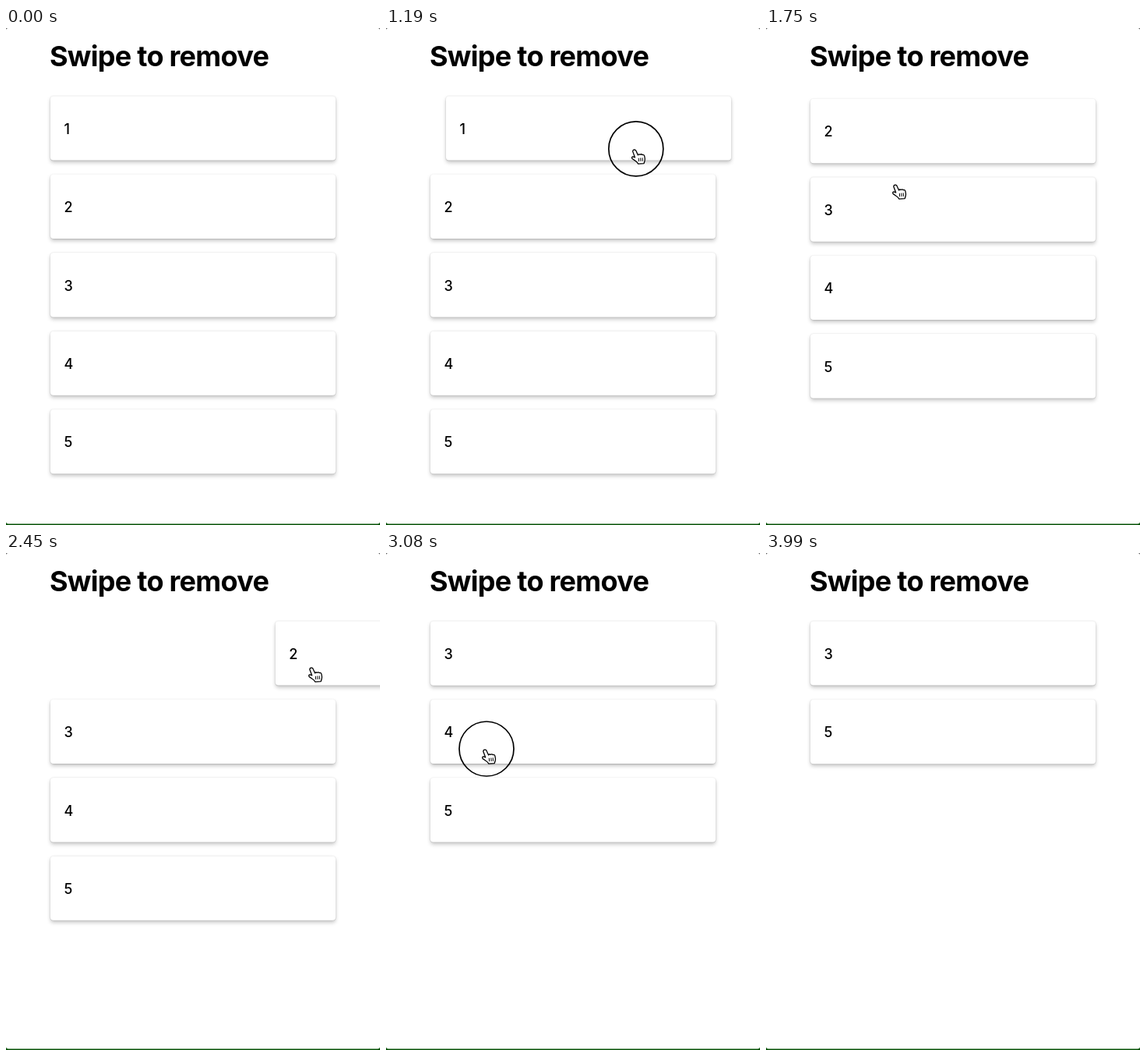
An HTML page with a canvas for the animation above (4.2 s loop, 480x637 px).

```html
<!DOCTYPE html>
<html lang="en">
<head>
<meta charset="utf-8">
<title>Swipe to remove</title>
<style>
  html, body { margin: 0; width: 100%; height: 100%; overflow: hidden; background: #fff; }
  canvas { display: block; }
</style>
</head>
<body>
<canvas id="stage" width="480" height="637"></canvas>
<script>
const ctx = document.getElementById('stage').getContext('2d');
const LOOP = 4200, STEP = 70;
const CARD = { x: 57, y: 87.2, w: 366, h: 82.4, pitch: 100.4 };

// Every swipe follows the same rule from the moment its drag starts.
const swipes = [{ card: 0, start: 1120 }, { card: 1, start: 2184 }, { card: 3, start: 3126 }];
const SWIPE_MS = 306;
const dragOffset = ms => 20 * (Math.max(0, ms) / 70) ** 2;
const isPressed = ms => ms >= -50 && ms < 190;

// Turning points of the pointer, eased in between.
const pointer = [
  { t: 140, x: 321, y: 202 },
  { t: 210, x: 279, y: 134 },
  { t: 1050, x: 279, y: 134 },
  { t: 1120, x: 301, y: 154 },
  { t: 1400, x: 428, y: 160 },
  { t: 1750, x: 168, y: 200 },
  { t: 2184, x: 105, y: 146 },
  { t: 2450, x: 394, y: 146 },
  { t: 3080, x: 129, y: 251 },
  { t: 3330, x: 320, y: 262 },
  { t: 3570, x: 195, y: 444.5 },
  { t: 3850, x: 260, y: 602 },
];
const POINTER_END = 3990;

const handShape = new Path2D(`M-4.2 3.2 Q-3.6.6-1.4 1.2 Q-.2 1.6.4 3.2 L2.6 8
  Q3.6 6.4 5.2 7.4 Q6.8 6.2 8.1 7.6 Q10.5 7 11 9.6 L11.5 13 Q11.4 15.4 10.2 18.6
  L2.9 19.2 Q1.2 16.4-1 15.2 L-4.8 12.6 Q-6.2 10.6-4 9.9 L-1.3 11 Z`);
const handLines = new Path2D('M3.3 11.8l.4 4.4M5.8 11.6l.4 4.4M8.2 11.4l.3 4.4');
const arrowShape = new Path2D('M0 0V14L3.2 11 5.5 16.6 8 15.5 5.7 10H9.9Z');

const smooth = u => u * u * (3 - 2 * u);

function pointerAt(t) {
  const next = pointer.findIndex(p => p.t > t);
  if (next < 0) return pointer[pointer.length - 1];
  const a = pointer[next - 1], b = pointer[next];
  const u = smooth((t - a.t) / (b.t - a.t));
  return { x: a.x + (b.x - a.x) * u, y: a.y + (b.y - a.y) * u };
}

// Share of the gap still open after a removal, as a critically damped spring.
function gapLeft(ms) {
  const s = Math.max(0, ms) * 0.0158;
  return (1 + s) * Math.exp(-s);
}

function layout(t) {
  const cards = [];
  let row = 0;
  for (let i = 0; i < 5; i++) {
    const swipe = swipes.find(s => s.card === i);
    const ms = swipe ? t - swipe.start : 0;
    if (ms >= SWIPE_MS) {
      row += gapLeft(ms - SWIPE_MS);
      continue;
    }
    cards.push({
      label: String(i + 1),
      x: CARD.x + dragOffset(ms),
      y: CARD.y + row * CARD.pitch,
    });
    row++;
  }
  return cards;
}

function drawBackdrop() {
  ctx.fillStyle = '#555';
  ctx.fillRect(0, 0, 480, 600);
  ctx.fillStyle = '#075207';
  ctx.fillRect(0, 600, 480, 37);
  ctx.fillStyle = '#fff';
  ctx.beginPath();
  ctx.roundRect(0, 0, 480, 635.5, 3);
  ctx.fill();
}

function fillWithShadow(alpha, blur, dy) {
  ctx.shadowColor = `rgba(0,0,0,${alpha})`;
  ctx.shadowBlur = blur;
  ctx.shadowOffsetY = dy;
  ctx.fill();
}

function drawText(text, x, y, font, spacing) {
  ctx.font = `${font} Inter, "Liberation Sans", sans-serif`;
  ctx.letterSpacing = spacing;
  ctx.fillStyle = '#000';
  ctx.fillText(text, x, y);
}

function drawCard({ label, x, y }) {
  ctx.save();
  ctx.fillStyle = '#fff';
  ctx.beginPath();
  ctx.roundRect(x, y, CARD.w, CARD.h, 4);
  fillWithShadow(0.22, 5, 3);
  fillWithShadow(0.24, 1.5, 0.3);
  ctx.restore();
  drawText(label, x + 17.5, y + 48.6, '500 18px', '0px');
}

function drawHand() {
  ctx.fillStyle = '#fff';
  ctx.strokeStyle = '#000';
  ctx.lineWidth = 1.3;
  ctx.fill(handShape);
  ctx.stroke(handShape);
  ctx.lineWidth = 1;
  ctx.stroke(handLines);
}

function drawArrow() {
  ctx.fillStyle = '#000';
  ctx.strokeStyle = '#fff';
  ctx.lineWidth = 2;
  ctx.shadowColor = 'rgba(0,0,0,.35)';
  ctx.shadowBlur = 2;
  ctx.shadowOffsetY = 1;
  ctx.stroke(arrowShape);
  ctx.shadowColor = 'transparent';
  ctx.fill(arrowShape);
}

function drawPressRing() {
  ctx.strokeStyle = '#000';
  ctx.lineWidth = 1.7;
  ctx.beginPath();
  ctx.arc(0, 0, 35, 0, Math.PI * 2);
  ctx.stroke();
}

function drawPointer(t, cards) {
  const { x, y } = pointerAt(t);
  const overCard = cards.some(c =>
    x >= c.x && x <= c.x + CARD.w && y >= c.y && y <= c.y + CARD.h);
  ctx.save();
  ctx.translate(x, y);
  ctx.lineJoin = 'round';
  if (swipes.some(s => isPressed(t - s.start))) drawPressRing();
  if (overCard) drawHand();
  else drawArrow();
  ctx.restore();
}

function render(t) {
  const cards = layout(t);
  drawBackdrop();
  drawText('Swipe to remove', 56, 49.3, '700 36px', '-0.72px');
  cards.forEach(drawCard);
  if (t >= pointer[0].t && t < POINTER_END) drawPointer(t, cards);
}

const start = performance.now();
function tick() {
  const t = (performance.now() - start) % LOOP;
  render(Math.floor(t / STEP) * STEP);
  requestAnimationFrame(tick);
}
tick();
</script>
</body>
</html>
```
